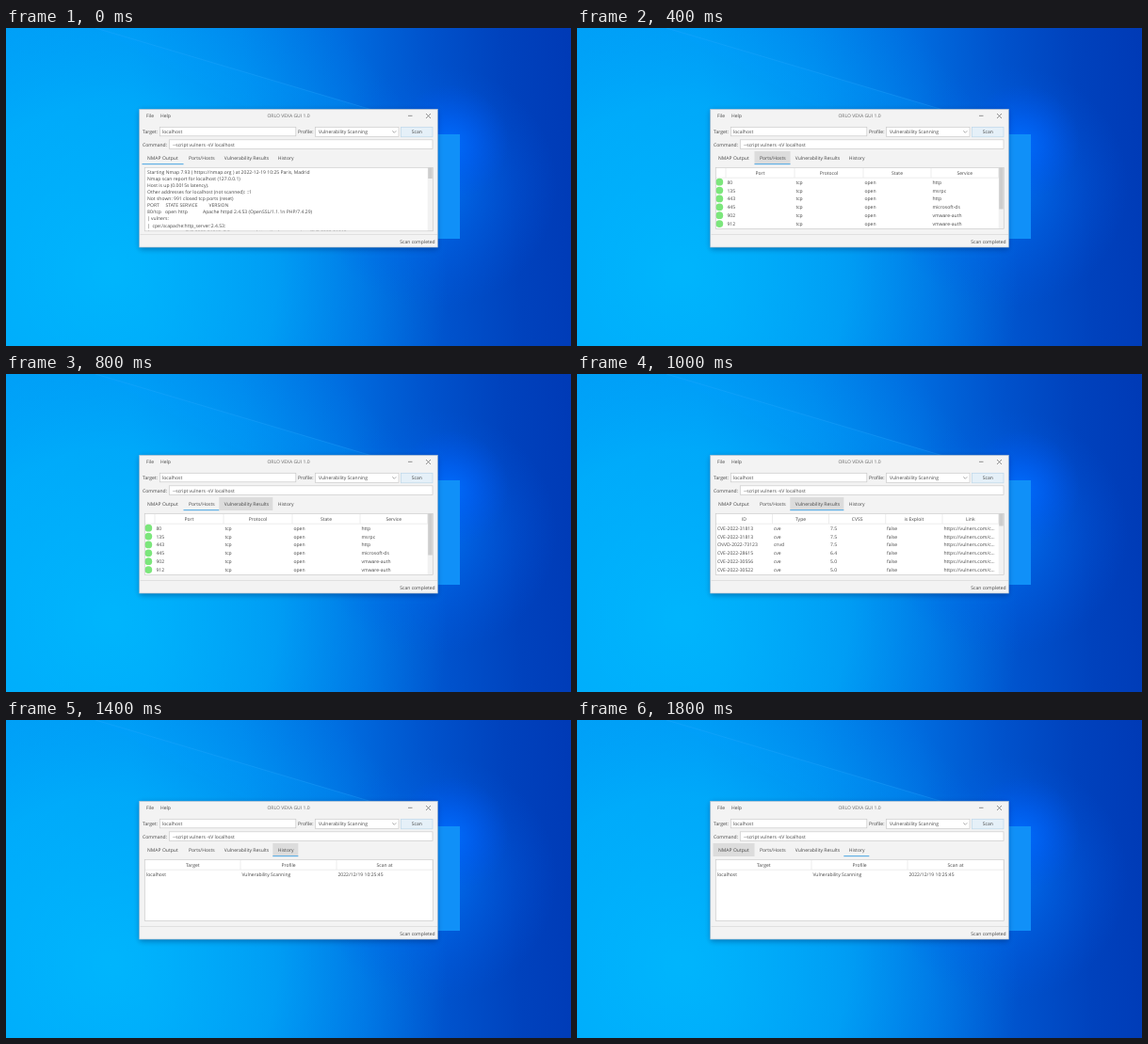
An HTML page with a canvas for the animation above (1900 ms loop, 600 by 338 pixels).

```html
<!DOCTYPE html>
<html lang="en">
<head>
<meta charset="utf-8">
<title>Scanner window</title>
<style>
  html, body { margin: 0; width: 100%; height: 100%; overflow: hidden; background: #0068d8; }
  canvas { display: block; width: 600px; height: 338px; }
</style>
</head>
<body>
<canvas id="stage" width="600" height="338"></canvas>
<script>
const ctx = document.getElementById('stage').getContext('2d');
const LOOP = 1900;
const INK = '#444';
const BORDER = '#cacaca';

const TABS = [
  { label: 'NMAP Output', x: 144.5, w: 44, textX: 150 },
  { label: 'Ports/Hosts', x: 188.5, w: 38, textX: 194 },
  { label: 'Vulnerability Results', x: 226.3, w: 57, textX: 231.7 },
  { label: 'History', x: 283.3, w: 27, textX: 288.7 }
];

// start time, selected tab, hovered tab (-1: none)
const STATES = [
  [0, 0, -1], [100, 0, 1], [300, 1, 1], [600, 1, -1], [700, 1, 2],
  [900, 2, 2], [1200, 2, 3], [1300, 3, 3], [1600, 3, -1], [1700, 3, 0]
];

const TABLES = {
  1: {
    edges: [158, 231, 304, 376, 447.5],
    heads: ['Port', 'Protocol', 'State', 'Service'],
    thumb: 44, icons: true,
    rows: [['80', 'http'], ['135', 'msrpc'], ['443', 'http'], ['445', 'microsoft-ds'],
      ['902', 'vmware-auth'], ['912', 'vmware-auth']]
      .map(([port, service]) => [port, 'tcp', 'open', service])
  },
  2: {
    edges: [147.5, 207.5, 267.5, 327.7, 388, 447.5],
    heads: ['ID', 'Type', 'CVSS', 'is Exploit', 'Link'],
    thumb: 13,
    rows: [['CVE-2022-31813', '7.5'], ['CVE-2022-31813', '7.5'], ['CNVD-2022-73123', '7.5'],
      ['CVE-2022-28615', '6.4'], ['CVE-2022-30556', '5.0'], ['CVE-2022-30522', '5.0']]
      .map(([id, score]) => [id, id.split('-')[0].toLowerCase(), score, 'false', 'https://vulners.com/c...'])
  },
  3: {
    edges: [147.5, 249, 351, 453],
    heads: ['Target', 'Profile', 'Scan at'],
    rows: [['localhost', 'Vulnerability Scanning', '2022/12/19 10:25:45']]
  }
};

// each line is a list of x, text pairs
const OUTPUT = [
  [150, 'Starting Nmap 7.93 ( https://nmap.org ) at 2022-12-19 10:25 Paris, Madrid'],
  [150, 'Nmap scan report for localhost (127.0.0.1)'],
  [150, 'Host is up (0.0015s latency).'],
  [150, 'Other addresses for localhost (not scanned): ::1'],
  [150, 'Not shown: 991 closed tcp ports (reset)'],
  [150, 'PORT', 169.5, 'STATE SERVICE', 215.5, 'VERSION'],
  [150, '80/tcp', 169, 'open', 183, 'http', 209, 'Apache httpd 2.4.53 (OpenSSL/1.1.1n PHP/7.4.29)'],
  [150, '| vulners:'],
  [150, '|', 155.5, 'cpe:/a:apache:http_server:2.4.53:'],
  [150, '|', 190, 'CVE-2022-31813  7.5', 266, 'https://vulners.com/cve/CVE-2022-31813']
];

function rect(x, y, w, h, fill, stroke) {
  if (fill) { ctx.fillStyle = fill; ctx.fillRect(x, y, w, h); }
  if (stroke) {
    ctx.strokeStyle = stroke;
    ctx.lineWidth = 0.7;
    ctx.strokeRect(x, y, w, h);
  }
}

function line(points, color, width = 0.7) {
  ctx.beginPath();
  points.forEach(([x, y], i) => i ? ctx.lineTo(x, y) : ctx.moveTo(x, y));
  ctx.strokeStyle = color;
  ctx.lineWidth = width;
  ctx.stroke();
}

// Scaled-down large type keeps glyph spacing even at small sizes.
function text(str, x, midY, align = 'left', color = INK) {
  const size = 5.05;
  ctx.save();
  ctx.translate(x, midY + size * 0.39);
  ctx.scale(0.1, 0.1);
  ctx.font = `${size * 10}px "Open Sans", "Noto Sans", sans-serif`;
  ctx.textRendering = 'geometricPrecision';
  ctx.textAlign = align;
  ctx.fillStyle = color;
  ctx.fillText(str, 0, 0);
  ctx.restore();
}

function gradient(g, stops) {
  stops.forEach(([at, color]) => g.addColorStop(at, color));
  return g;
}

function glow(x, y, radius, stops) {
  rect(0, 0, 600, 338, gradient(ctx.createRadialGradient(x, y, 0, x, y, radius), stops));
}

function drawWallpaper() {
  rect(0, 0, 600, 338, gradient(ctx.createLinearGradient(0, 40, 600, 0), [
    [0, '#009ff6'], [0.22, '#0099f4'], [0.42, '#0085eb'], [0.6, '#006cdf'],
    [0.75, '#0052cc'], [0.88, '#0042bd'], [1, '#003ab6']
  ]));
  glow(110, 260, 360, [
    [0, 'rgba(0,190,255,.75)'], [0.5, 'rgba(0,184,255,.5)'], [1, 'rgba(0,150,250,0)']
  ]);
  // soft beam along the upper edge of the light cone
  ctx.beginPath();
  ctx.moveTo(95, 0);
  ctx.lineTo(460, 108);
  ctx.lineTo(300, 108);
  ctx.fillStyle = gradient(ctx.createLinearGradient(300, 60, 286, 108), [
    [0, 'rgba(0,160,255,.22)'], [1, 'rgba(0,160,255,0)']
  ]);
  ctx.fill();
  line([[95, 0], [460, 108]], 'rgba(50,170,255,.32)', 0.9);
  glow(455, 168, 130, [
    [0, 'rgba(0,125,255,.7)'], [0.4, 'rgba(0,110,245,.4)'], [1, 'rgba(0,90,230,0)']
  ]);
  glow(472, 122, 62, [
    [0, 'rgba(0,110,255,.85)'], [0.4, 'rgba(0,100,255,.5)'], [1, 'rgba(0,85,240,0)']
  ]);
  rect(371, 113, 111, 111, '#1090f8');
}

function drawWindow() {
  ctx.save();
  ctx.shadowColor = 'rgba(0,20,70,.4)';
  ctx.shadowBlur = 6;
  ctx.shadowOffsetY = 1.5;
  rect(141.7, 86.3, 316.6, 146.7, '#f3f3f3');
  ctx.restore();
  rect(141.7, 86.3, 316.6, 146.7, null, '#b4c2d0');

  text('File', 149, 93.5);
  text('Help', 164, 93.5);
  text('ORLO VEXA GUI 1.0', 300, 93.5, 'center', '#666');
  line([[427, 93.3], [431.5, 93.3]], '#666');
  line([[446, 91], [451, 96]], '#666');
  line([[451, 91], [446, 96]], '#666');

  text('Target:', 145, 110.3);
  rect(163.3, 105.3, 144.5, 9.5, '#fff', BORDER);
  text('localhost', 166, 110);
  text('Profile:', 310, 110.3);
  rect(328.5, 105.3, 88.5, 10, '#fff', BORDER);
  text('Vulnerability Scanning', 332, 110.3);
  line([[410.3, 109.3], [412.3, 111.3], [414.3, 109.3]], '#888');
  rect(419.5, 105.3, 33.5, 10.5, '#e5f0f8', '#bcd7ea');
  text('Scan', 436.3, 110.5, 'center');
  text('Command:', 145, 124);
  rect(173.3, 118.8, 279.7, 9.5, '#fff', BORDER);
  text('--script vulners -sV localhost', 177, 123.7);

  line([[142.5, 219.5], [458, 219.5]], '#d8d8d8');
  text('Scan completed', 455.7, 227, 'right');
}

function drawTabs(selected, hovered) {
  TABS.forEach((tab, i) => {
    if (i === hovered) rect(tab.x, 131, tab.w, 14, '#dcdcdc');
    if (i === selected) rect(tab.x, 144, tab.w, 1.2, '#62b0e4');
    text(tab.label, tab.textX, 138.2);
  });
}

function drawScrollbar(bottom, thumb) {
  rect(447.7, 148.3, 5.3, bottom - 148.3, '#f2f2f2');
  rect(448.2, 148.5, 4.5, thumb, '#cdcdcd');
}

function drawOutput() {
  ctx.save();
  ctx.beginPath();
  ctx.rect(147.3, 148, 306, 68);
  ctx.clip();
  rect(147, 148, 307, 68, '#fff');
  OUTPUT.forEach((parts, row) => {
    for (let i = 0; i < parts.length; i += 2) text(parts[i + 1], parts[i], 153.3 + row * 7.03);
  });
  drawScrollbar(216, 11.5);
  ctx.restore();
  rect(147.3, 148.3, 306, 67.5, null, BORDER);
}

function drawTable({ edges, heads, rows, thumb, icons }) {
  rect(147.3, 148.3, 306, 65, '#fff');
  heads.forEach((head, col) => {
    text(head, (edges[col] + edges[col + 1]) / 2, 154, 'center');
    line([[edges[col + 1], 149], [edges[col + 1], 159]], '#e6e6e6');
  });
  if (icons) line([[edges[0], 149], [edges[0], 159]], '#e6e6e6');
  line([[147.3, 159.2], [453, 159.2]], '#e6e6e6');
  rows.forEach((cells, row) => {
    const y = 163.7 + row * 8.87;
    if (icons) {
      ctx.beginPath();
      ctx.arc(151.3, y, 3.9, 0, Math.PI * 2);
      ctx.fillStyle = '#7ce67c';
      ctx.fill();
    }
    cells.forEach((cell, col) => text(cell, edges[col] + 1.4, y));
  });
  if (thumb) drawScrollbar(213.3, thumb);
  rect(147.3, 148.3, 306, 65, null, BORDER);
}

function render(now) {
  const t = now % LOOP;
  const [, selected, hovered] = STATES.filter(([start]) => t >= start).pop();
  drawWallpaper();
  drawWindow();
  drawTabs(selected, hovered);
  if (selected === 0) drawOutput();
  else drawTable(TABLES[selected]);
}

const begin = performance.now();
function tick() {
  render(performance.now() - begin);
  requestAnimationFrame(tick);
}
tick();
</script>
</body>
</html>
```
